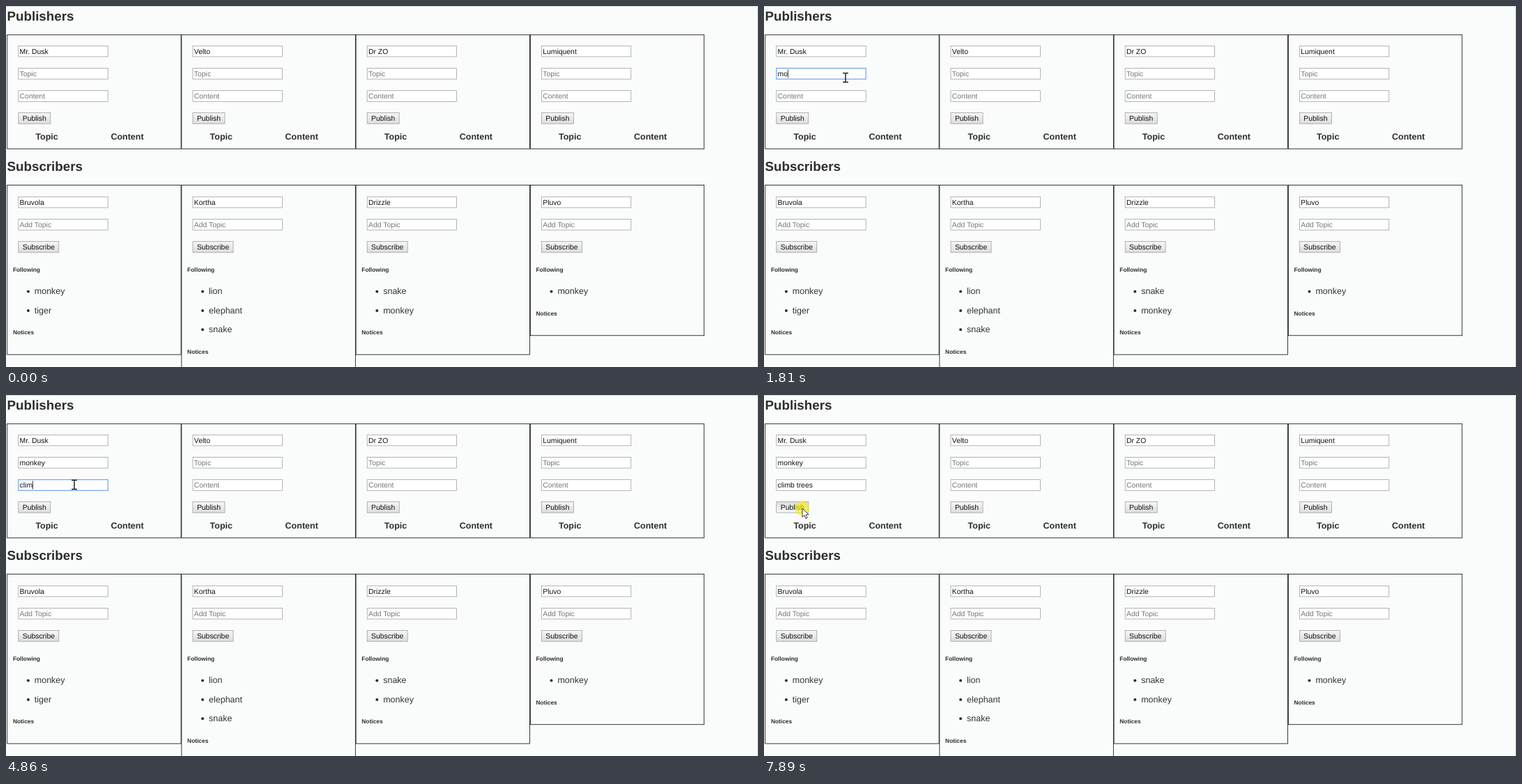
Write an HTML page that moves like this. It is 1079 px wide and 519 px high and loops after 8 s.

```html
<!DOCTYPE html>
<html lang="en">
<head>
<meta charset="utf-8">
<title>Publishers and subscribers</title>
<style>
  html, body { margin: 0; width: 100%; height: 100%; overflow: hidden; background: #fafcfb; }
  svg { display: block; }
  text { font-family: "Liberation Sans", Arial, sans-serif; white-space: pre; text-rendering: geometricPrecision; }
  .h2 { font-size: 18.77px; font-weight: bold; fill: #2d2d2d; }
  .th { font-size: 12.51px; font-weight: bold; fill: #2d2d2d; text-anchor: middle; }
  .h5 { font-size: 8.38px; font-weight: bold; fill: #2d2d2d; }
  .li { font-size: 12.51px; fill: #333; }
  .ui { font-size: 10.42px; fill: #111; }
  .hint { fill: #757575; }
</style>
</head>
<body>
<svg id="stage" width="1079" height="519" viewBox="0 0 1079 519">
  <defs>
    <linearGradient id="up" x2="0" y2="1">
      <stop offset="0" stop-color="#f6f6f6"/><stop offset="1" stop-color="#dddddd"/>
    </linearGradient>
    <linearGradient id="down" x2="0" y2="1">
      <stop offset="0" stop-color="#dddddd"/><stop offset="1" stop-color="#f6f6f6"/>
    </linearGradient>
  </defs>
</svg>
<script>
const LOOP = 8000;
const PITCH = 250.2;
const LINE = 0.78;
const FIELD_W = 128.4;
const FIELD_H = 15.6;
const stage = document.getElementById('stage');

function add(tag, attrs, parent = stage) {
  const el = document.createElementNS('http://www.w3.org/2000/svg', tag);
  for (const key in attrs) el.setAttribute(key, attrs[key]);
  parent.appendChild(el);
  return el;
}

function frame(x, y, width, height, fill, stroke) {
  return add('rect', { x, y, width, height, fill, stroke, 'stroke-width': LINE });
}

function label(cls, x, y, str) {
  const el = add('text', { class: cls, x, y });
  el.textContent = str;
  return el;
}

function show(el, on) {
  el.style.display = on ? '' : 'none';
}

const fields = [];

function field(x, y, str, isHint) {
  const left = x + 16.2;
  const top = y + 0.3;
  const box = frame(left, top, FIELD_W, FIELD_H, '#fff', '#9e9e9e');
  const text = label(isHint ? 'ui hint' : 'ui', x + 18, y + 11.6, str);
  const item = { box, text, hint: str, left, top, textX: x + 18 };
  fields.push(item);
  return item;
}

function button(x, y, width, str) {
  const box = frame(x + 16.2, y + 0.6, width, FIELD_H, 'url(#up)', '#9e9e9e');
  label('ui', x + 22.1, y + 11.9, str);
  return box;
}

function panel(x, top, bottom) {
  frame(x + 0.1, top, PITCH - LINE, bottom - top, 'none', '#000');
}

function publisher(name, i) {
  const x = 1.6 + PITCH * i;
  panel(x, 41.3, 205.3);
  field(x, 57, name);
  const topic = field(x, 89.2, 'Topic', true);
  const content = field(x, 121.4, 'Content', true);
  const publish = button(x, 153, 46, 'Publish');
  label('th', x + 57, 191.7, 'Topic');
  label('th', x + 172.4, 191.7, 'Content');
  return { topic, content, publish };
}

function subscriber([name, ...topics], i) {
  const x = 1.6 + PITCH * i;
  const end = 414.4 + 27.37 * topics.length;
  panel(x, 257.6, end + 32);
  field(x, 274, name);
  field(x, 306.2, 'Add Topic', true);
  button(x, 338, 58, 'Subscribe');
  label('h5', x + 8.3, 382, 'Following');
  topics.forEach((topic, n) => {
    const y = 414.4 + 27.37 * n;
    add('circle', { cx: x + 30.3, cy: y - 3.8, r: 2, fill: '#2d2d2d' });
    label('li', x + 39.2, y, topic);
  });
  label('h5', x + 8.3, end + 3, 'Notices');
}

add('path', { d: 'M0 .5H1078.5V519', fill: 'none', stroke: '#d2d3d3' });
label('h2', 1.5, 20.7, 'Publishers');
label('h2', 1.5, 237, 'Subscribers');

const form = ['Mr. Dusk', 'Velto', 'Dr ZO', 'Lumiquent'].map(publisher)[0];
[
  ['Bruvola', 'monkey', 'tiger'],
  ['Kortha', 'lion', 'elephant', 'snake'],
  ['Drizzle', 'snake', 'monkey'],
  ['Pluvo', 'monkey']
].forEach(subscriber);

const caret = add('rect', { width: 0.8, height: 12, fill: '#111' });
const glow = add('circle', { r: 10.3, fill: '#f8ec10', opacity: 0.65 });
const beam = add('path', {
  d: 'M-3.8 -6.5H-1L0 -5.8L1 -6.5H3.8M0 -5.8V5.8M-3.8 6.5H-1L0 5.8L1 6.5H3.8',
  fill: 'none', stroke: '#151515', 'stroke-width': 1.4
});
const arrow = add('path', {
  d: 'M0 0V12.6L3 9.8L5 14.6L7.1 13.7L5.1 9H9.1Z',
  fill: '#fff', stroke: '#222', 'stroke-width': 0.9
});

// Pointer moves: start, end, number of jumps, destination, ease-out power
const START = [883, 508];
const MOVES = [
  [70, 1110, 13, 117, 103, 2],
  [3290, 3600, 4, 104, 140, 1],
  [3600, 3920, 3, 98, 129, 2],
  [7110, 7420, 4, 57, 171, 1.5],
  [7420, 7570, 1, 57, 169, 1],
  [7570, 7890, 3, 55, 163, 1]
];
const CLICKS = [[1110, 1340], [3920, 4070], [7890, 8000]];
const CARET_ON = [[1110, 1660], [1740, 3290], [3920, 7110]];
const TOPIC_KEYS = [1740, 1810, 2220, 2400, 2590, 2770];
const CONTENT_KEYS = [4240, 4470, 4660, 4860, 5250, 5400, 5710, 5870, 6100, 6330, 6560];

const within = (spans, t) => spans.some(([a, b]) => t >= a && t < b);

function pointerAt(t) {
  let [x, y] = START;
  for (const [from, to, jumps, nx, ny, power] of MOVES) {
    if (t < from) break;
    const p = Math.min(1, Math.floor((t - from) / (to - from) * jumps + 1e-6) / jumps);
    const eased = 1 - Math.pow(1 - p, power);
    x += (nx - x) * eased;
    y += (ny - y) * eased;
  }
  return [x, y];
}

function typeInto(item, str, keys, t) {
  const typed = str.slice(0, keys.filter(k => t >= k).length);
  item.text.textContent = typed || item.hint;
  item.text.setAttribute('class', typed ? 'ui' : 'ui hint');
  item.caretX = item.textX + (typed ? item.text.getComputedTextLength() : 0);
}

function setFocus(item, on) {
  item.box.setAttribute('stroke', on ? '#6fa3ea' : '#9e9e9e');
  item.box.setAttribute('stroke-width', on ? 1.2 : LINE);
}

function render(t) {
  typeInto(form.topic, 'monkey', TOPIC_KEYS, t);
  typeInto(form.content, 'climb trees', CONTENT_KEYS, t);

  const onTopic = t >= 1110 && t < 3920;
  const onContent = t >= 3920 && t < 7890;
  setFocus(form.topic, onTopic);
  setFocus(form.content, onContent);
  const active = onTopic ? form.topic : form.content;
  caret.setAttribute('x', active.caretX);
  caret.setAttribute('y', active.top + 1.8);
  show(caret, within(CARET_ON, t));

  form.publish.setAttribute('fill', t >= 7890 ? 'url(#down)' : 'url(#up)');

  const [x, y] = pointerAt(t);
  const overField = fields.some(f =>
    x >= f.left && x <= f.left + FIELD_W && y >= f.top && y <= f.top + FIELD_H);
  const place = `translate(${x} ${y})`;
  beam.setAttribute('transform', place);
  arrow.setAttribute('transform', place);
  glow.setAttribute('transform', `translate(${x - 0.8} ${y - 0.3})`);
  show(beam, t >= 70 && overField);
  show(arrow, t >= 70 && !overField);
  show(glow, within(CLICKS, t));
}

const began = performance.now();
function tick() {
  render((performance.now() - began) % LOOP);
  requestAnimationFrame(tick);
}
render(0);
requestAnimationFrame(tick);
</script>
</body>
</html>
```
